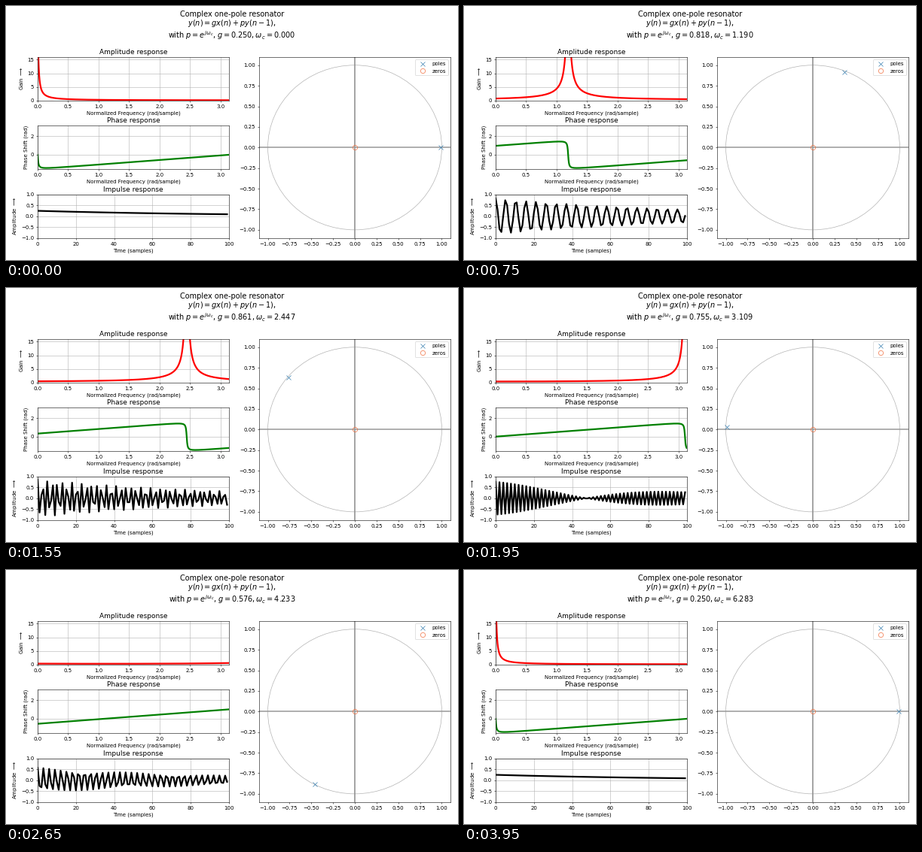
Recreate the animation shown at these times as a matplotlib script. Size 600 by 338 pixels, loop 4 s.

```python
import numpy as np
import matplotlib.pyplot as plt
from matplotlib.animation import FuncAnimation
from matplotlib.patches import Circle

W, H, DPI = 600, 338, 50
FRAMES, INTERVAL = 80, 50
STEPS = 95          # centre-frequency steps in one turn
RADIUS = 0.99       # pole radius

plt.rcParams["font.family"] = "DejaVu Sans"
fig = plt.figure(figsize=(W / DPI, H / DPI), dpi=DPI, facecolor="white")


def add_axes(left, top, right, bottom):
    """Axes from pixel edges measured from the top left corner."""
    return fig.add_axes([left / W, 1 - bottom / H,
                         (right - left) / W, (bottom - top) / H])


def response_axes(top, title, xlabel, ylabel, xlim, ylim, color):
    ax = add_axes(42, top, 296, top + 58)
    ax.set_title(title, fontsize=13)
    ax.set(xlabel=xlabel, ylabel=ylabel, xlim=xlim, ylim=ylim)
    ax.grid(True)
    line, = ax.plot([], [], color=color, lw=3.2)
    return line


FREQ = "Normalized Frequency (rad/sample)"
gain_line = response_axes(67.8, "Amplitude response", FREQ,
                          r"Gain $\longrightarrow$",
                          (0, np.pi), (0, 16), "red")
phase_line = response_axes(159.3, "Phase response", FREQ,
                           "Phase Shift (rad)",
                           (0, np.pi), (-np.pi / 2, np.pi), "green")
impulse_line = response_axes(250.8, "Impulse response", "Time (samples)",
                             r"Amplitude $\longrightarrow$",
                             (0, 100), (-1, 1), "black")

# pole-zero plane
plane = add_axes(336, 67.8, 590, 308.8)
plane.set(xlim=(-1.1, 1.1), ylim=(-1.1, 1.1))
plane.add_patch(Circle((0, 0), 1, fill=False, color="0.7"))
plane.axvline(0, color="0.55", lw=2.2)
plane.axhline(0, color="0.6", lw=2.2)
pole, = plane.plot([], [], "x", ms=9, color="#3a80b0", label="poles")
plane.plot([0], [0], "o", ms=9, mfc="none", mec="#f07040", label="zeros")
plane.legend(loc="upper right")

title = fig.text(0.5, 1 - 5.5 / H, "", fontsize=14, ha="center", va="top",
                 linespacing=1.1)

w = np.linspace(0, np.pi, 512, endpoint=False)
n = np.arange(100)


def update(i):
    wc = 2 * np.pi * round(i * 1.2) / STEPS
    g = np.interp(wc, [0, np.pi / 2, 2 * np.pi], [0.25, 1, 0.25])
    p = RADIUS * np.exp(1j * wc)
    h = g / (1 - p * np.exp(-1j * w))
    gain_line.set_data(w, np.abs(h))
    phase_line.set_data(w, np.angle(h))
    impulse_line.set_data(n, g * (p ** n).real)
    pole.set_data([p.real], [p.imag])
    title.set_text("Complex one-pole resonator\n"
                   "$y(n) = gx(n) + py(n-1),$\n"
                   r"with $p=e^{j\omega_c}$, "
                   rf"$g={g:.3f}, \omega_c={wc:.3f}$")
    return gain_line, phase_line, impulse_line, pole, title


anim = FuncAnimation(fig, update, frames=FRAMES, interval=INTERVAL,
                     repeat=True, repeat_delay=0, blit=False)
plt.show()
```
